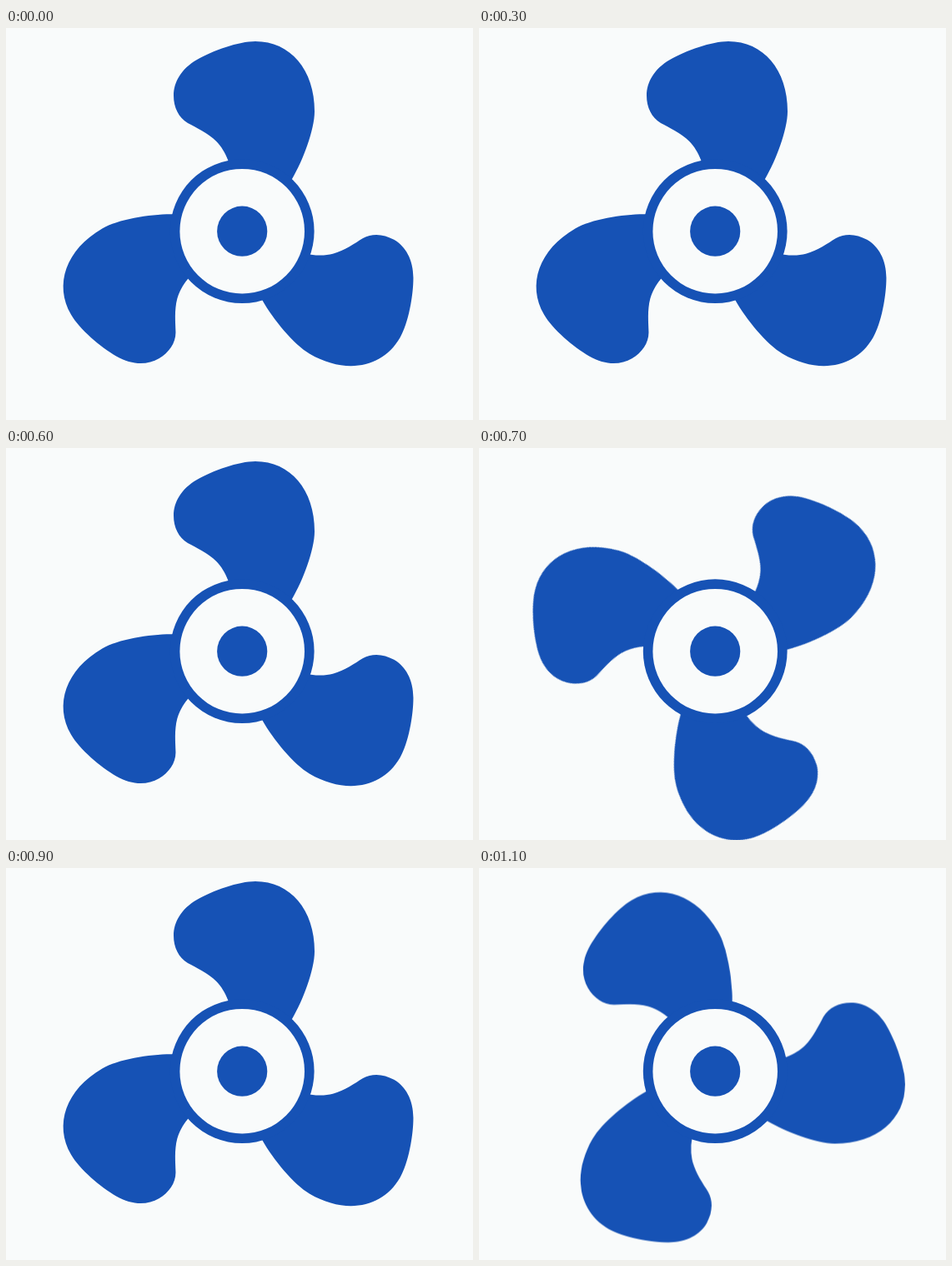
An HTML page for the animation above (1.2 s loop, 560x470 px).

```html
<!DOCTYPE html>
<html lang="en">
<head>
<meta charset="utf-8">
<title>Spinning propeller</title>
<style>
  html, body { margin: 0; width: 100%; height: 100%; overflow: hidden; background: #f9fbfb; }
  svg { display: block; fill: #1652b5; }
  /* Three held poses; the three-fold symmetry hides the jump back. */
  .rotor {
    transform-origin: 283.2px 243.7px;
    animation: spin 300ms steps(3, jump-end) -1ms infinite;
  }
  @keyframes spin {
    from { transform: rotate(0deg); }
    to { transform: rotate(135deg); }
  }
  .gap { fill: #f9fbfb; }
</style>
</head>
<body>
<svg width="560" height="470" viewBox="0 0 560 470">
  <defs>
    <path id="blade" d="M335 195 L343 181
      C356 159 370 122 370 100
      C370 50 341 16 299 16
      C279 16 248 27 229 38
      C210 49 201 65 201 81
      C201 95 207 107.6 218 114
      C228 119.5 242 125.7 252.3 136
      C258 141.7 263 150 266 158
      L275 180 Z"/>
  </defs>
  <g class="rotor">
    <use href="#blade"/>
    <use href="#blade" transform="rotate(120 283.2 243.7)"/>
    <use href="#blade" transform="rotate(240 283.2 243.7)"/>
  </g>
  <circle cx="283.2" cy="243.7" r="86.4"/>
  <circle class="gap" cx="283.2" cy="243.7" r="74.8"/>
  <circle cx="283.2" cy="243.7" r="30.1"/>
</svg>
</body>
</html>
```
